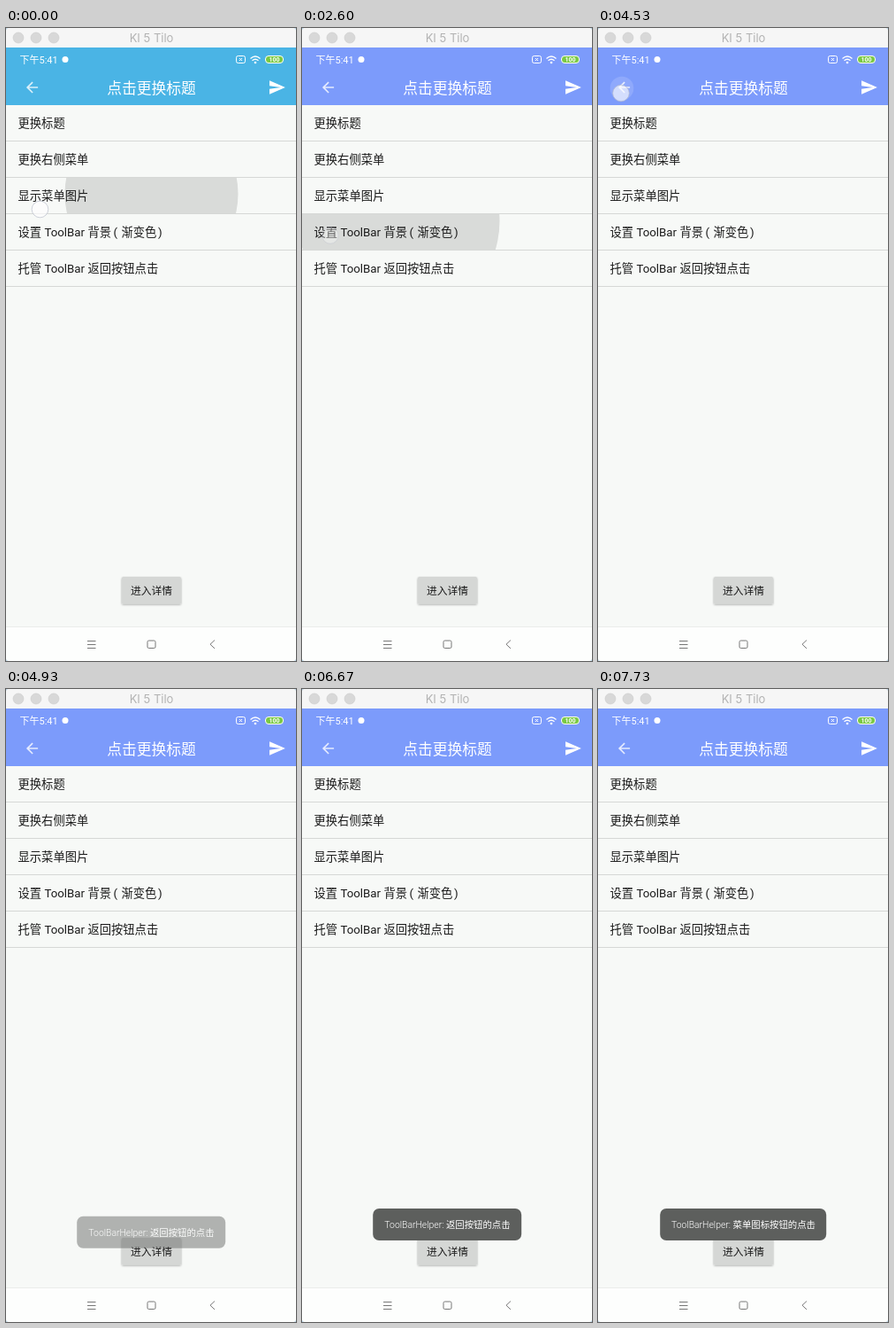
Animation, 328 px wide and 714 px high, one loop 8000 ms. Source, as an HTML page:

```html
<!DOCTYPE html>
<html lang="zh-CN">
<head>
<meta charset="utf-8">
<style>
  html, body { margin: 0; width: 100%; height: 100%; overflow: hidden; background: #b9d2e2; }
  svg { display: block; font-family: Roboto, "Noto Sans CJK SC", "Noto Sans CJK", sans-serif; }
  .mid { text-anchor: middle; }
  .line { fill: none; stroke: #fff; }
  .nav { fill: none; stroke: #777; }
</style>
</head>
<body>
<svg width="328" height="714" viewBox="0 0 328 714">
  <defs>
    <clipPath id="window"><rect width="328" height="714" rx="4"/></clipPath>
    <clipPath id="rowClip"><rect id="rowBox" width="328" height="41"/></clipPath>
    <filter id="shadow" x="-10%" y="-20%" width="120%" height="150%">
      <feDropShadow dx="0" dy="1" stdDeviation="1" flood-opacity=".35"/>
    </filter>
  </defs>
  <g clip-path="url(#window)">
    <rect width="328" height="714" fill="#f7f9f7"/>
    <rect width="328" height="22" fill="#f6f6f6"/>
    <g fill="#d8d8d8" stroke="#cbcbcb" stroke-width=".6">
      <circle cx="14" cy="11" r="6"/><circle cx="34" cy="11" r="6"/><circle cx="54" cy="11" r="6"/>
    </g>
    <text class="mid" x="164.5" y="16" font-size="13" fill="#b3b3b3" style="font-family: Inter, sans-serif">KI 5 Tilo</text>

    <rect id="bar" y="22" width="328" height="65"/>
    <g fill="#fff">
      <text x="15.5" y="39.8" font-size="11">下午5:41</text>
      <circle cx="67" cy="35.5" r="3.5"/>
      <g class="line">
        <rect x="260.5" y="31.5" width="10" height="8" rx="2"/>
        <path d="M264 34l3 3m0-3l-3 3"/>
        <path d="M276.5 34.5q5.500-5 11 0M278.500 36.800q3.500-3.200 7 0" stroke-width="1.3"/>
        <rect x="293.500" y="31.500" width="20" height="8" rx="3.500" fill="#7ac943"/>
      </g>
      <circle cx="282" cy="39" r="1.300"/>
      <text class="mid" x="303.500" y="38.200" font-size="7" font-weight="bold">100</text>
      <circle id="barRipple" cx="27" cy="68"/>
      <path opacity=".8" transform="translate(19.700 57.200) scale(.82)" d="M20 11H7.830l5.590-5.590L12 4l-8 8 8 8 1.410-1.410L7.830 13H20z"/>
      <text class="mid" x="164.500" y="73.800" font-size="16.800" font-weight="300">点击更换标题</text>
      <path transform="translate(296.300 56.800) scale(.85)" d="M2 21L23 12 2 3v7l15 2-15 2z"/>
    </g>

    <g clip-path="url(#rowClip)"><circle id="ripple"/></g>
    <path d="M0 127.500h328M0 168.500h328M0 209.500h328M0 250.500h328M0 291.500h328" stroke="#d6d8d6"/>
    <g font-size="13.300" fill="#1b1b1b">
      <text x="13.500" y="112.300">更换标题</text>
      <text x="13.500" y="153.300">更换右侧菜单</text>
      <text x="13.500" y="194.300">显示菜单图片</text>
      <text x="13.500" y="235.300">设置 ToolBar 背景<tspan x="121.500">(</tspan><tspan x="130.500">渐变色</tspan><tspan x="172">)</tspan></text>
      <text x="13.500" y="276.300">托管 ToolBar 返回按钮点击</text>
    </g>

    <rect x="131" y="619" width="67" height="30.500" rx="1.500" fill="#d5d7d5" filter="url(#shadow)"/>
    <text class="mid" x="164.500" y="638.800" font-size="11.800" fill="#1b1b1b">进入详情</text>

    <rect y="675" width="328" height="39" fill="#fdfefd"/>
    <path d="M0 675.500h328" stroke="#ebedeb"/>
    <g class="nav">
      <path d="M92 691.500h9.500M92 695.500h9.500M92 699.500h9.500"/>
      <rect x="160" y="691" width="9" height="8.500" rx="1.500"/>
      <path d="M236 690.500l-5 4.700 5 4.700"/>
    </g>

    <g id="toast" fill="#fff">
      <rect id="toastBox" y="586" height="36" rx="7" fill="#585a58" fill-opacity=".97"/>
      <text id="toastText" class="mid" x="164.500" y="608" font-size="10.400" font-weight="300"></text>
    </g>
    <circle id="touch" r="9.300" fill="#fff" fill-opacity=".62" stroke="#b5bac8" stroke-opacity=".65"/>
  </g>
</svg>
<script>
const LOOP = 8000, STEP = 1000 / 15;
const $ = id => document.getElementById(id);
const set = (id, attrs) => { for (const k in attrs) $(id).setAttribute(k, attrs[k]); };
const ramp = (t, from, to) => Math.min(1, Math.max(0, (t - from) / (to - from)));
const mix = (a, b, k) => a + (b - a) * k;

const taps = [
  { x: 38.5, y: 204.5, on: 0, up: 0, gone: 200 },
  { x: 32, y: 234, on: 2465, up: 2530, gone: 2670 },
  { x: 26, y: 73.5, on: 4525, up: 4600, gone: 4800 },
  { x: 303, y: 77, on: 6730, up: 6900, gone: 7050 }
];
const toasts = [
  { text: '返回按钮的点击', width: 168, start: 4800, end: 6730 },
  { text: '菜单图标按钮的点击', width: 188, start: 6982, end: 9000 }
];

function drawRipple(t) {
  if (t < 2400) {
    set('rowBox', { y: 168.5 });
    set('ripple', { cx: 164.5, cy: 187, r: mix(98, 165, ramp(t, 0, 200)), opacity: .12 * (1 - ramp(t, 30, 250)) });
  } else {
    const k = ramp(t, 2465, 2694);
    set('rowBox', { y: 209.5 });
    set('ripple', {
      cx: mix(32, 164, k), cy: mix(200, 230, k), r: mix(40, 165, k),
      opacity: t < 2465 ? 0 : .12 * (1 - ramp(t, 2640, 2930))
    });
  }
  set('barRipple', { r: mix(13, 22, ramp(t, 4525, 4750)), opacity: t < 4525 ? 0 : .14 * (1 - ramp(t, 4620, 4900)) });
}

function drawToast(t) {
  const toast = toasts.find(o => t >= o.start && t < o.end + 200);
  const enter = toast ? ramp(t, toast.start, toast.start + 290) : 0;
  const leave = toast ? ramp(t, toast.end, toast.end + 200) : 0;
  const drop = 30 * (1 - enter) ** 2 + 28 * leave ** 2;
  set('toast', { opacity: enter * (1 - leave), transform: `translate(0 ${drop})` });
  if (!toast) return;
  set('toastBox', { x: 164.2 - toast.width / 2, width: toast.width });
  $('toastText').textContent = 'ToolBarHelper: ' + toast.text;
}

function draw(now) {
  const t = Math.floor((now % LOOP + 5) / STEP) * STEP;
  set('bar', { fill: t < 2590 ? '#4ab4e5' : '#7c9bfb' });
  drawRipple(t);
  drawToast(t);
  const tap = taps.find(o => t >= o.on && t < o.gone);
  set('touch', tap
    ? { cx: tap.x, cy: tap.y, opacity: 1 - ramp(t, tap.up, tap.gone) }
    : { opacity: 0 });
  requestAnimationFrame(() => draw(performance.now() - origin));
}
const origin = performance.now();
draw(0);
</script>
</body>
</html>
```
